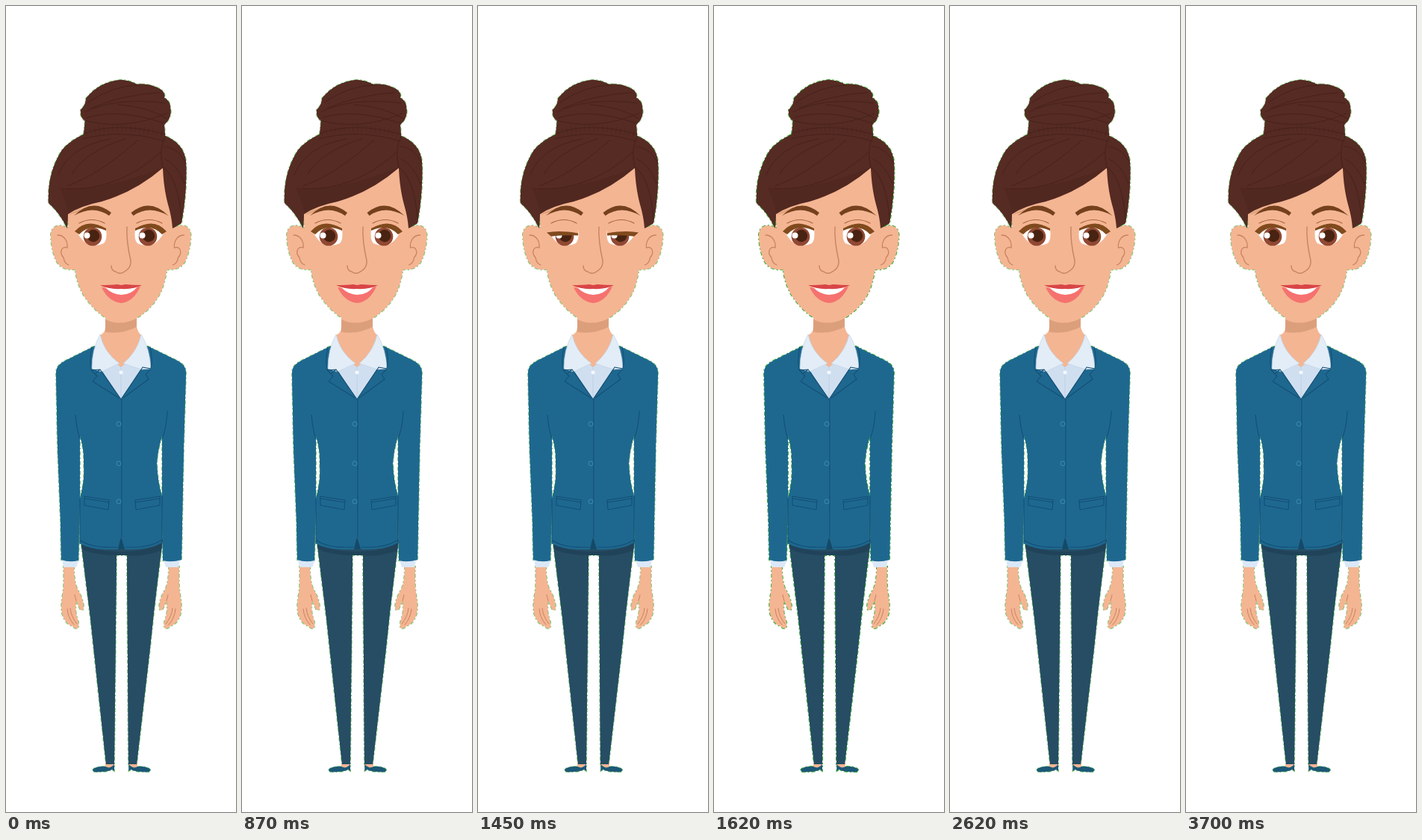
An HTML page without scripts that plays this animation: 308x1080 px, repeating every 3800 ms.

```html
<!DOCTYPE html>
<html lang="en">
<head>
<meta charset="utf-8">
<title>Standing woman</title>
<style>
  html, body { margin: 0; width: 100%; height: 100%; overflow: hidden; background: #fff; }
  svg { display: block; width: 100vw; height: 100vh; }
  .line { fill: none; stroke-linecap: round; stroke-linejoin: round; }
  .skin { fill: #f4b592; }
  .crease { stroke: #c88460; }
  .strand { stroke: #43201a; }
  .seam { stroke: #144f74; stroke-width: 1.1; }

  /* Broken green fringe around the whole figure */
  .fringe { stroke: #3fae3a; stroke-width: 2; stroke-dasharray: 5 3 2 3;
            animation: fringe 3.8s step-end infinite; }
  @keyframes fringe {
    0% { stroke-opacity: .65; }
    42.4% { stroke-opacity: 1; }
    43.7% { stroke-opacity: .65; }
  }

  /* Blink */
  .lid { fill: #f4b592; animation: lid 3.8s linear infinite; }
  .lash { fill: #804a1d; animation: lash 3.8s linear infinite; }
  @keyframes lid {
    0%, 31.8%, 39.5%, 100% { d: path("M92 302Q112 285 134 298L134 299Q112 286 93 303Z"); }
    35%, 36.2% { d: path("M92 302Q112 285 134 298L134 314Q112 329 93 307Z"); }
  }
  @keyframes lash {
    0%, 31.8%, 39.5%, 100% { d: path("M92 302Q108 283 134 298L134 301Q112 291 98 306Z"); }
    35%, 36.2% { d: path("M92 306Q108 326 134 314L134 317Q112 331 98 313Z"); }
  }
</style>
</head>
<body>
<svg viewBox="0 0 308 1080" preserveAspectRatio="none">
  <defs>
    <path id="hand" class="skin" d="M77 751H91Q91 770 95 780Q104 795 104 806Q103 812 99 808L94 797Q92 810 95 819Q99 829 96 834Q92 835 89 831Q79 828 75 814Q73 803 76 788Q78 775 77 751Z"/>
    <path id="fingers" class="line crease" d="M82 808Q83 820 91 829M86 807Q87 818 95 828M92 789L94 797"/>
    <path id="shoe" fill="#1d5877" d="M116 1024Q118 1019 133 1019Q139 1023 145 1016V1025L142 1023Q134 1027 118 1026Z"/>
    <path id="trousers" fill="#264d63" d="M100 715H210Q200 790 193 860L175 1016H164L162 736H148L145 1016H134L113 820Z"/>
    <path id="jacket" fill="#1e6890" fill-rule="evenodd" d="M118 456L80 475Q67 481 67 491L69 590L73 690L74 742Q85 746 97 743L99 665L99 720Q115 730 150 728L154 712L158 728Q190 730 209 719L209 665L210 743Q222 746 235 742L238 590L241 491Q241 481 229 475L190 456Z
      M99 576Q105 595 104 613Q106 635 99 660ZM209 576Q203 595 202 613Q203 638 209 657Z"/>
    <path id="pocket" class="line seam" d="M105 657L138 662L137 675L105 669ZM106 660L137 665"/>
    <path id="ear" class="skin" d="M94 296L84 298C70 290 59 295 60 310Q61 329 68 343Q75 355 94 353Z"/>
    <path id="earline" class="line crease" stroke-width="1.3" d="M69 307C78 307 83 315 82 324C74 321 71 331 77 337Q78 345 84 347"/>
    <path id="face" class="skin" d="M82 270L84 300L92 346Q93 369 104 388Q120 411 136 419Q155 428 174 419Q197 405 208 382Q215 364 216 346L226 290L212 205Z"/>
    <path id="hair" fill="#562b23" d="M104 172L106 153Q99 151 100 139Q107 133 107 124Q124 102 153 99Q164 99 176 105Q190 103 206 111Q214 116 212 123Q220 127 220 136Q223 149 212 159L213 174Q238 184 241 208Q243 247 235 291L223 298Q222 283 217 266Q211 244 210 217Q173 249 128 262Q99 268 83 279L82 298Q72 277 57 264Q55 224 75 193Q86 180 104 172Z"/>
    <path id="brow" fill="#74401e" d="M91 281Q116 256 141 277L138 281Q117 266 91 281Z"/>
    <path id="white" fill="#fff" d="M95 303Q113 286 134 299Q136 313 131 318Q121 323 109 319Q101 314 95 303Z"/>
    <path id="fold" class="line" stroke="#a8683f" stroke-width="1.2" d="M98 291Q115 282 132 291"/>
    <g id="iris">
      <circle cx="116" cy="309" r="12.3" fill="#914832"/>
      <circle cx="117" cy="308" r="8.3" fill="#482312"/>
      <circle cx="108.500" cy="307.500" r="4" fill="#fff"/>
    </g>
  </defs>

  <!-- Fringe behind everything, so only its outer rim shows -->
  <g class="fringe">
    <use href="#shoe"/>
    <use href="#shoe" transform="matrix(-1 0 0 1 309.500 0)"/>
    <use href="#trousers"/>
    <use href="#hand"/>
    <use href="#hand" transform="matrix(-1 0 0 1 309 0)"/>
    <use href="#jacket"/>
    <use href="#ear"/>
    <use href="#ear" transform="matrix(-1 0 0 1 307.500 0)"/>
    <use href="#face"/>
    <use href="#hair"/>
  </g>

  <!-- Legs and hands -->
  <path class="skin" d="M133 1014H145V1018L139 1022L133 1019ZM176 1014H164V1018L170 1022L176 1019Z"/>
  <use href="#shoe"/>
  <use href="#shoe" transform="matrix(-1 0 0 1 309.500 0)"/>
  <use href="#trousers"/>
  <path fill="#20435a" d="M101 720Q125 732 153 731Q185 732 209 720L208 730Q180 739 162 736H148Q120 736 102 728Z"/>
  <use href="#hand"/>
  <use href="#hand" transform="matrix(-1 0 0 1 309 0)"/>
  <use href="#fingers"/>
  <use href="#fingers" transform="matrix(-1 0 0 1 309 0)"/>
  <path fill="#dbe8f8" d="M75 742H98L94 752H77ZM211 742H233L231 752H214Z"/>

  <!-- Jacket -->
  <use href="#jacket"/>
  <path fill="#144a68" d="M154 711L150 728H159Z"/>
  <path class="line seam" d="M155 527V711M93 548Q95 570 99 580M216 543Q215 565 209 580M99 660V720M209 657V719M100 716Q115 727 149 725M160 725Q190 727 208 716"/>
  <use href="#pocket"/>
  <use href="#pocket" transform="matrix(-1 0 0 1 311 0)"/>
  <g fill="none" stroke="#3a8bb0">
    <circle cx="151" cy="560" r="3"/>
    <circle cx="151" cy="613" r="3"/>
    <circle cx="151" cy="664" r="3"/>
  </g>

  <!-- Shirt, neck and lapels -->
  <path fill="#d0dff0" d="M126 485L150 472H160L183 483L154 527Z"/>
  <path class="skin" d="M133 405H175V430Q177 438 181 441Q182 463 154 484Q127 466 126 441Q133 438 133 430Z"/>
  <path fill="#dc9f7c" d="M133 420Q154 430 175 418V430Q156 440 133 437Z"/>
  <path fill="#e3edf7" stroke="#bfd3e6" stroke-width=".7" d="M126 440Q131 464 152 479L128 490L115 486Q115 460 126 440ZM181 440Q176 463 157 479L181 487L194 486Q193 460 181 440Z"/>
  <path class="line" stroke="#b9cde1" stroke-width=".8" d="M154 483V526"/>
  <circle cx="154" cy="491" r="2.500" fill="#f4f8fc"/>
  <path class="line seam" d="M115 457Q111 474 114 488L126 487L154 527L183 484L194 486Q197 472 193 457M114 488L122 496L116 503L151 525M194 486L187 494L191 500L157 525M126 487L120 492"/>

  <!-- Head -->
  <use href="#ear"/>
  <use href="#ear" transform="matrix(-1 0 0 1 307.500 0)"/>
  <use href="#earline"/>
  <use href="#earline" transform="matrix(-1 0 0 1 307.500 0)"/>
  <use href="#face"/>
  <path fill="#dfa078" d="M84 280Q88 276 106 270L97 276Z"/>

  <!-- Hair -->
  <use href="#hair"/>
  <path fill="#4a241d" d="M72 243Q120 252 210 216Q175 247 128 262Q98 267 84 277Q78 258 72 243Z" opacity=".4"/>
  <path class="line strand" opacity=".8" d="M104 153Q155 168 215 144M107 150Q150 136 212 157M106 142Q145 122 213 130M110 129Q145 106 178 106M114 137Q155 119 205 116M150 132Q190 135 216 151M104 171Q150 154 213 172M103 178Q155 164 212 181M210 217Q204 193 213 174M211 217Q230 230 235 284M213 205Q229 212 239 238M70 226Q85 188 140 178M82 241Q125 226 176 180M88 225Q108 194 160 178M81 245Q150 248 207 196M212 188Q230 190 240 209"/>
  <path fill="none" class="strand" stroke-width="9" stroke-dasharray="1 5" d="M107 170Q155 157 211 172" opacity=".35"/>

  <!-- Face -->
  <use href="#brow"/>
  <use href="#brow" transform="matrix(-1 0 0 1 308.500 0)"/>
  <use href="#white"/>
  <use href="#white" transform="matrix(-1 0 0 1 307 0)"/>
  <use href="#iris"/>
  <use href="#iris" x="74"/>
  <g>
    <path class="lid"/>
    <path class="lash"/>
    <use href="#fold"/>
  </g>
  <g transform="matrix(-1 0 0 1 307 0)">
    <path class="lid"/>
    <path class="lash"/>
    <use href="#fold"/>
  </g>
  <path class="line crease" stroke-width="1.4" d="M162 296Q161 315 167 341Q168 350 160 355Q153 361 147 356Q141 355 141 348"/>
  <path fill="#f5726f" d="M128 377Q154 383 180 376Q170 397 154 398Q137 396 128 377Z"/>
  <path fill="#fff" d="M133 377Q154 380 176 376Q168 387 154 387Q141 386 133 377Z"/>
  <path fill="#d94547" d="M126 374Q140 374 149 373L154 374L160 373Q170 374 182 374Q171 380 154 379Q138 380 126 374Z"/>
</svg>
</body>
</html>
```
